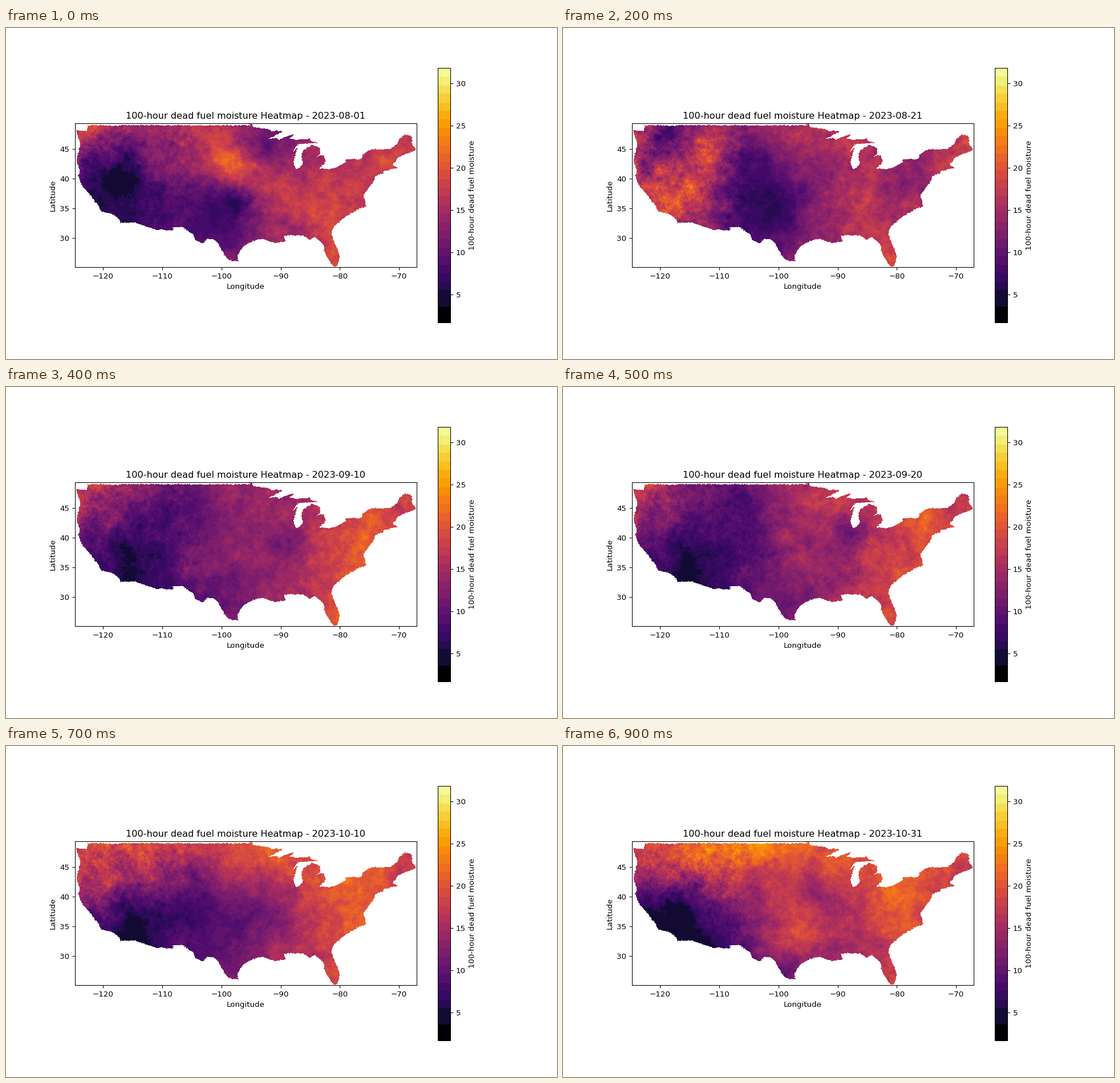
Recreate the animation shown at these times as a matplotlib script. Size 966 px wide and 580 px high, loop 1000 ms.

```python
import numpy as np
import matplotlib.pyplot as plt
from matplotlib.animation import FuncAnimation
from matplotlib.colors import ListedColormap
from matplotlib.path import Path

WEST, EAST, SOUTH, NORTH = -124.767, -67.058, 25.067, 49.4
LOW, HIGH = 1.71, 31.84
NX, NY = 599, 253

# Key points of the outline, clockwise from the north-west corner (lon, lat).
NORTH_EDGE = [
    (-124.77, 48.3), (-124.2, 48.1), (-122.75, 48.1), (-122.7, 49.02), (-95.15, 49.02),
    (-95.15, 49.4), (-94.8, 49.3), (-94.6, 48.75), (-92.9, 48.6), (-91.4, 48.07),
    (-89.5, 48), (-92.1, 46.75), (-90.8, 46.95), (-90.4, 46.57), (-88.4, 47.35),
    (-87.8, 47.47), (-88.45, 46.8), (-87.35, 46.5), (-85, 46.77), (-84.9, 46.48),
    (-83.6, 46.1)]
LAKES = [
    (-84.7, 46.05), (-87.1, 45.75), (-88, 44.55), (-87.1, 45.25), (-87.9, 43),
    (-87.5, 41.7), (-87.1, 41.65), (-86.25, 42.5), (-86.5, 43.7), (-86.25, 44.7),
    (-85.2, 45.4), (-84.7, 45.78), (-83.4, 45.2), (-83.35, 44.3), (-83.9, 43.7),
    (-82.95, 44.07), (-82.45, 43), (-82.5, 42.6), (-83.4, 41.7), (-81.7, 41.5),
    (-80.5, 41.98), (-78.9, 42.9), (-79.05, 43.27), (-76.9, 43.28), (-76.2, 43.55),
    (-76.2, 44.05), (-74.7, 45)]
ATLANTIC = [
    (-71.5, 45.01), (-70.4, 45.8), (-70, 46.7), (-69.2, 47.45), (-68.3, 47.35),
    (-67.8, 47.07), (-67.8, 45.7), (-67.06, 44.9), (-70.2, 43.6), (-71, 42.3),
    (-70.2, 41.78), (-71.9, 41.33), (-72.9, 41.25), (-72.3, 41), (-74, 40.5),
    (-74.1, 39.75), (-75.1, 38.6), (-75.95, 37.15), (-75.55, 35.3), (-77.3, 34.5),
    (-78.9, 33.7), (-81, 32), (-81.45, 30.7), (-80.55, 28.3), (-80.05, 26.8),
    (-80.4, 25.1), (-81.1, 25.1)]
GULF = [
    (-81.75, 25.95), (-82.75, 27.7), (-82.65, 28.7), (-84.1, 30.1), (-85.2, 29.65),
    (-86.2, 30.35), (-89.4, 30.35), (-89.2, 29.4), (-90.9, 29.1), (-93.2, 29.78),
    (-94.8, 29.3), (-96.6, 28.35), (-97.4, 26.9), (-97.15, 25.97), (-98.2, 26.05),
    (-99.1, 26.4), (-100.7, 29.1), (-101.4, 29.77), (-102.5, 29.8), (-103.15, 28.98),
    (-104.5, 29.65), (-104.9, 30.6), (-106.5, 31.77), (-108.2, 31.77), (-108.2, 31.33),
    (-111.07, 31.33), (-114.8, 32.5), (-117.1, 32.53)]
PACIFIC = [
    (-117.3, 33.1), (-118.5, 34.03), (-120.5, 34.45), (-120.65, 35.1), (-122.5, 37.5),
    (-123.75, 39), (-124.35, 40.4), (-124.1, 41), (-124.5, 42.85), (-124, 46)]

# Moisture anchors (lon, lat, value) that hold all season, then those of each day.
CLIMATE = [(-124, 47.5, 18), (-81, 27, 19), (-70, 45, 17.5), (-91, 31, 14.5),
           (-98, 28, 11), (-83.5, 33, 17.5), (-85.5, 37, 17), (-108, 32.5, 8)]
DAYS = [
    [(-118, 41, 4.6), (-109, 39, 10), (-102, 48, 17), (-98, 41.4, 21), (-98, 36, 6.5),
     (-93, 44.5, 10), (-93, 38.5, 17)],
    [(-119.5, 47, 6.5), (-116, 39, 20.5), (-112, 44.5, 17.5), (-106, 42, 8),
     (-100, 34, 6.3), (-97, 47.5, 15.5), (-78.5, 39, 12.5)],
    [(-122, 45, 16), (-118, 38, 5.5), (-110, 44, 8.5), (-106, 35, 13), (-99, 33, 8.5),
     (-92, 41, 12), (-80, 36, 22)],
    [(-119, 43.5, 11), (-115.5, 35.5, 4.5), (-106, 46, 8.5), (-98, 36.5, 15.5),
     (-93, 45.5, 17), (-88, 40.3, 10.5), (-75, 43, 19.5)],
    [(-121, 44, 22), (-115, 35.5, 4.5), (-107, 40, 6.5), (-99, 45.5, 17.5),
     (-94, 39.5, 11), (-91, 46, 22), (-73, 42, 22.5)],
    [(-118, 45, 11), (-114.5, 35.5, 3.5), (-113, 42.5, 14.5), (-104, 35, 7.3),
     (-98, 45, 16.5), (-92, 37.5, 11), (-82, 40, 22)],
    [(-116, 45.5, 18.5), (-117.5, 38, 4.2), (-107, 40, 13.5), (-102, 48, 24),
     (-95, 41.5, 14), (-97, 34.3, 20), (-80.5, 41, 22)],
]
# Date shown and its place in DAYS; halves blend two neighbours.
SCHEDULE = [("08-01", 0), ("08-11", .5), ("08-21", 1), ("08-31", 2), ("09-10", 2.5),
            ("09-20", 3), ("09-30", 4), ("10-10", 4.5), ("10-20", 5), ("10-31", 6)]


def noise(seed, slope):
    """Unit-variance cloud noise; a higher slope is smoother."""
    white = np.random.default_rng(seed).normal(size=(NY, NX))
    freq = np.hypot(np.fft.fftfreq(NY)[:, None], np.fft.fftfreq(NX)) + 0.01
    cloud = np.fft.ifft2(np.fft.fft2(white) / freq ** slope).real
    return (cloud - cloud.mean()) / cloud.std()


def kernel(points, anchors):
    """Multiquadric distance from every point to every anchor."""
    gap = points[:, None, :] - anchors[None, :, :]
    return np.sqrt((gap ** 2).sum(axis=2) + 0.6)


lon, lat = np.meshgrid(np.linspace(WEST, EAST, NX), np.linspace(NORTH, SOUTH, NY))
outline = Path(NORTH_EDGE + LAKES + ATLANTIC + GULF + PACIFIC)
ragged = np.column_stack([(lon + .07 * noise(1, 1)).ravel(), (lat + .05 * noise(2, 1)).ravel()])
land = outline.contains_points(ragged).reshape(NY, NX)

warped = np.column_stack([(lon + .5 * noise(3, 1.6))[land], (lat + .4 * noise(4, 1.6))[land]])
mountains = 1 / (1 + np.exp((lon[land] + 104.5) / 1.3))
terrain = noise(5, 1.4)[land] * mountains


def interpolate(day):
    """Smooth surface through the seasonal and daily anchors."""
    anchors = np.array(CLIMATE + day)
    places, values = anchors[:, :2], anchors[:, 2]
    weights = np.linalg.solve(kernel(places, places), values - values.mean())
    return values.mean() + kernel(warped, places) @ weights


fields = [interpolate(day) for day in DAYS]


def heatmap(index):
    place = SCHEDULE[index][1]
    field = (fields[int(np.floor(place))] + fields[int(np.ceil(place))]) / 2
    weather = .8 * noise(20 + index, 1.7)[land] + .3 * noise(40 + index, 1.3)[land]
    grain = (weather + 1.1 * terrain) * np.clip(field / 13, .25, 1.2)
    grid = np.full((NY, NX), np.nan)
    grid[land] = np.maximum(field + grain, 3.6)
    return grid


def banded_inferno():
    edges = np.r_[LOW, 3.5, np.linspace(5.5, HIGH, 27)]
    shades = (edges[:-1] + edges[1:]) / 2
    shades[0] = LOW
    band = np.searchsorted(edges, np.linspace(LOW, HIGH, 256), "right") - 1
    band = np.clip(band, 0, len(shades) - 1)
    return ListedColormap(plt.get_cmap("inferno")((shades[band] - LOW) / (HIGH - LOW)))


fig, ax = plt.subplots(figsize=(10.0005, 6.0045), dpi=96.6)  # 966 x 580 px
image = ax.imshow(heatmap(0), cmap=banded_inferno(), vmin=LOW, vmax=HIGH,
                  extent=(WEST, EAST, SOUTH, NORTH), interpolation="nearest")
fig.colorbar(image, ax=ax, label="100-hour dead fuel moisture")
ax.set_xlabel("Longitude")
ax.set_ylabel("Latitude")
title = ax.set_title("")


def update(index):
    image.set_data(heatmap(index))
    title.set_text(f"100-hour dead fuel moisture Heatmap - 2023-{SCHEDULE[index][0]}")
    return image, title


animation = FuncAnimation(fig, update, frames=len(SCHEDULE), interval=100,
                          repeat=True, repeat_delay=0, blit=False)
plt.show()
```
